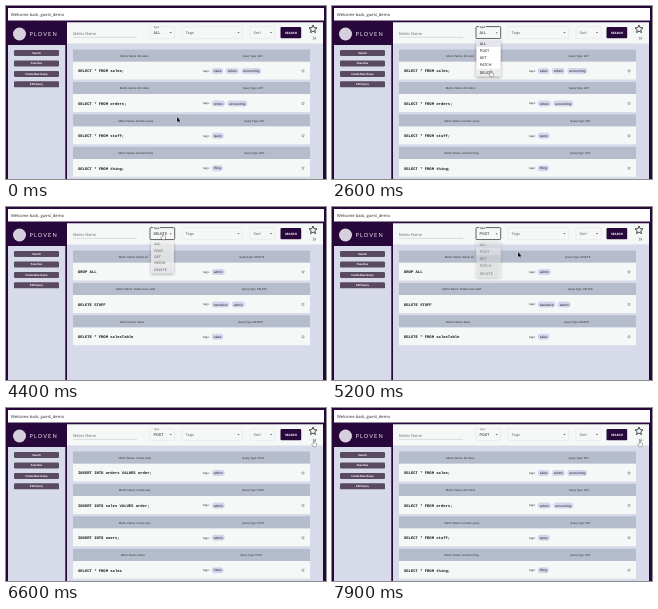
These frames come from a looping animation (320 by 173 pixels, 8000 ms). An HTML page with a canvas:

```html
<!DOCTYPE html>
<html lang="en">
<head>
<meta charset="utf-8">
<title>Query library</title>
<style>
html, body { margin: 0; width: 320px; height: 173px; overflow: hidden; }
canvas { display: block; width: 320px; height: 173px; }
</style>
</head>
<body>
<canvas id="stage"></canvas>
<script>
const canvas = document.getElementById('stage');
const c = canvas.getContext('2d');
const dpr = window.devicePixelRatio || 1;
canvas.width = 320 * dpr;
canvas.height = 173 * dpr;

const LOOP = 8000, STEP = 100;
const DARK = '#28083a', LAVENDER = '#d7dbe9', PAPER = '#f6f8f8', INK = '#222';
const SANS = 'Roboto, sans-serif', MONO = '"Liberation Mono", monospace';
const OPTIONS = ['ALL', 'POST', 'GET', 'PATCH', 'DELETE'];

// Each query: title, statement, tags
const LISTS = {
  GET: [
    ['All sales', 'SELECT * FROM sales;', ['sales', 'orders', 'accounting']],
    ['All orders', 'SELECT * FROM orders;', ['orders', 'accounting']],
    ['Another query', 'SELECT * FROM stuff;', ['query']],
    ['Another thing', 'SELECT * FROM thing;', ['thing']]
  ],
  DELETE: [
    ['Delete all', 'DROP ALL', ['admin']],
    ['Delete more stuff', 'DELETE STUFF', ['executive', 'admin']],
    ['Sales', 'DELETE * FROM salesTable', ['sales']]
  ],
  POST: [
    ['Create order', 'INSERT INTO orders VALUES order;', ['admin']],
    ['Create sale', 'INSERT INTO sales VALUES order;', ['admin']],
    ['Create user', 'INSERT INTO users;', ['admin']],
    ['Sales', 'SELECT * FROM sales', ['Sales']]
  ],
  FAVORITES: []
};

// Pointer path: time, x, y
const PATH = [
  [0, 171, 111], [200, 171, 111], [500, 171, 66], [700, 171, 66],
  [1200, 110, 28], [1500, 110, 28], [1800, 162, 27], [2000, 162, 27],
  [2300, 158, 58], [2400, 158, 58], [2600, 159, 65], [2700, 159, 65],
  [3300, 283, 28], [3600, 283, 28], [4100, 157, 27], [4400, 157, 27],
  [4800, 156, 45], [5100, 156, 45], [5200, 186, 45], [5700, 284, 28],
  [6000, 284, 28], [6500, 308, 33], [6700, 308, 33], [7000, 307, 23],
  [7500, 307, 23], [7600, 308, 33], [8000, 308, 33]
];

const clamp = v => Math.max(0, Math.min(1, v));
const ramp = (t, from, to) => clamp((t - from) / (to - from));
const smooth = p => p * p * (3 - 2 * p);
const mix = (a, b, p) => a + (b - a) * p;
const within = (t, from, to) => t >= from && t < to;

function rect(x, y, w, h, fill, r = 0) {
  c.beginPath();
  c.roundRect(x, y, w, h, r);
  c.fillStyle = fill;
  c.fill();
}

function text(s, x, y, size, color = INK, { align = 'left', weight = 400, font = SANS } = {}) {
  c.font = `${weight} ${size}px ${font}`;
  c.textAlign = align;
  c.textBaseline = 'alphabetic';
  c.fillStyle = color;
  c.fillText(s, x, y + size * 0.355);
}

function widthOf(s, size) {
  c.font = `400 ${size}px ${SANS}`;
  return c.measureText(s).width;
}

function line(points, color, width) {
  c.beginPath();
  points.forEach(([x, y]) => c.lineTo(x, y));
  c.strokeStyle = color;
  c.lineWidth = width;
  c.stroke();
}

function star(x, y, r, color, width) {
  c.beginPath();
  for (let i = 0; i < 10; i++) {
    const a = i * Math.PI / 5 - Math.PI / 2, d = i % 2 ? r * 0.45 : r;
    c.lineTo(x + d * Math.cos(a), y + d * Math.sin(a));
  }
  c.closePath();
  c.strokeStyle = color;
  c.lineWidth = width;
  c.stroke();
}

function pointerAt(t) {
  const i = Math.max(1, PATH.findIndex(p => p[0] > t));
  const [t0, x0, y0] = PATH[i - 1], [t1, x1, y1] = PATH[i];
  const p = smooth(ramp(t, t0, t1));
  return [mix(x0, x1, p), mix(y0, y1, p)];
}

function drawShell() {
  rect(0, 0, 320, 173, DARK);
  rect(2, 2, 316, 12.5, '#fff');
  text('Welcome back, guest_demo', 5, 8.7, 4.1, INK, { font: '"Open Sans", sans-serif' });
  rect(2, 39, 57.3, 134, LAVENDER);
  rect(61, 16.5, 256, 156.5, LAVENDER);
  rect(61, 16.5, 256, 21, PAPER);

  c.beginPath();
  c.arc(13.5, 28, 6.5, 0, 7);
  c.fillStyle = '#d6cfdd';
  c.fill();
  c.letterSpacing = '1.1px';
  text('PLOVEN', 23.5, 27.6, 5.6, '#e9e4ee', { font: 'Lato, sans-serif' });
  c.letterSpacing = '0px';

  ['Search', 'Favorites', 'Create New Query', 'Edit Query'].forEach((label, i) => {
    const y = 44 + i * 10.45;
    rect(8, y, 45, 6, '#594a61', 1.2);
    text(label, 30.5, y + 3, 2.75, '#fff', { align: 'center', weight: 700 });
  });
}

function drawSelect(x, w, value, label, focused, hovered) {
  c.beginPath();
  c.roundRect(x, 20.6, w, 12, 1);
  c.strokeStyle = focused || hovered ? INK : '#d0d2d4';
  c.lineWidth = focused ? 0.7 : 0.3;
  c.stroke();
  if (label) {
    rect(x + 2.8, 19.8, 7, 1.6, PAPER);
    text(label, x + 3.4, 20.8, 2.8, focused ? INK : '#666');
  }
  text(value, x + 3.5, 26.6, 3.9, label ? INK : '#666');
  const ax = x + w - 4, up = focused ? -1 : 1;
  c.beginPath();
  c.moveTo(ax - 1.2, 26.6 - 0.6 * up);
  c.lineTo(ax + 1.2, 26.6 - 0.6 * up);
  c.lineTo(ax, 26.6 + 0.7 * up);
  c.fillStyle = '#666';
  c.fill();
}

function drawToolbar(t, type, [mx, my]) {
  const focus = ramp(t, 1200, 1400) * (1 - ramp(t, 1900, 2100));
  text('Metric Name', 67, mix(27.8, 22.6, focus), mix(4, 3, focus), focus > 0.5 ? INK : '#777');
  line([[67, 31.4], [131, 31.4]], '#999', 0.3);
  if (focus) line([[99 - 32 * focus, 31.3], [99 + 32 * focus, 31.3]], INK, 0.7);

  const open = within(t, 2000, 3400) || within(t, 4300, 5900);
  const over = mx > 143 && mx < 169 && my > 20 && my < 33;
  drawSelect(144, 24.7, type, 'Type', open, over);
  drawSelect(176, 60.5, 'Tags');
  drawSelect(244, 25, 'Sort');

  rect(274.5, 21, 20.7, 11.2, DARK, 1);
  text('SEARCH', 284.9, 26.6, 3.1, '#fff', { align: 'center', weight: 700 });

  star(307, 23.2, 4.2, '#111', 0.75);
  line([[306.8, 31], [308.3, 32.3], [306.8, 33.6]], '#333', 0.5);
  line([[308.6, 31], [310.1, 32.3], [308.6, 33.6]], '#333', 0.5);
}

function drawCard([title, sql, tags], y, method) {
  rect(67, y, 237, 12.2, '#b5bdcd');
  rect(67, y + 12.2, 237, 17.8, PAPER);

  const name = 'Metric Name: ' + title, kind = 'Query Type: ' + method;
  const nameW = widthOf(name, 2.8), kindW = widthOf(kind, 2.8);
  const pad = (237 - nameW - kindW) / 4;
  text(name, 67 + pad, y + 6.3, 2.8, '#333');
  text(kind, 304 - pad - kindW, y + 6.3, 2.8, '#333');

  const mid = y + 21.5;
  text(sql, 72, mid, 3.85, '#111', { weight: 700, font: MONO });
  text('tags:', 197, mid, 3, '#333');
  let x = 205.7;
  for (const tag of tags) {
    const w = widthOf(tag, 3.25) + 4;
    rect(x, mid - 3, w, 6, '#d2d5eb', 3);
    text(tag, x + 2, mid, 3.25, INK);
    x += w + 2.3;
  }
  star(297, mid, 1.5, '#555', 0.35);
}

function drawMenu(t, type, [mx, my]) {
  const first = ramp(t, 1950, 2150) * (1 - ramp(t, 2650, 2850));
  const second = ramp(t, 4250, 4450) * (1 - ramp(t, 5100, 5300));
  const shown = Math.max(first, second);
  if (!shown) return;
  const closing = within(t, 2650, 2900) || t > 5000;
  c.save();
  c.globalAlpha = shown;
  if (!closing) {
    c.translate(156.4, 34);
    c.scale(mix(0.75, 1, shown), mix(0.56, 1, shown));
    c.translate(-156.4, -34);
  }
  c.shadowColor = 'rgba(0,0,0,.4)';
  c.shadowBlur = 3 * dpr;
  c.shadowOffsetY = 1 * dpr;
  rect(144.3, 33.3, 24.4, 37.2, '#fff', 1);
  c.shadowColor = 'transparent';
  OPTIONS.forEach((option, i) => {
    const y = 33.7 + i * 7.25;
    const hover = mx < 169 && my >= y && my < y + 7.25;
    if (option === type) rect(144.3, y, 24.4, 7.25, '#e4e5ee');
    else if (hover) rect(144.3, y, 24.4, 7.25, '#ececec');
    text(option, 147.8, y + 3.6, 3.75);
  });
  c.restore();
}

function drawPointer([x, y], hand) {
  const arrow = 'M0 0V5L1.2 4L2 5.8L2.9 5.4L2.1 3.7H3.6Z';
  const fist = 'M-.5 0Q0-.5.5 0V2L2.4 2.5V4.4L1.8 5.6H-.7L-2 3.5L-1.5 3L-.5 3.6Z';
  const shape = new Path2D(hand ? fist : arrow);
  c.save();
  c.translate(x, y);
  c.lineWidth = 0.6;
  c.strokeStyle = hand ? '#111' : '#fff';
  c.fillStyle = hand ? '#fff' : '#111';
  c.stroke(shape);
  c.fill(shape);
  c.restore();
}

function listAt(t) {
  if (t < 3400) return 'GET';
  if (t < 5900) return 'DELETE';
  if (t < 7100) return 'POST';
  return t < 7700 ? 'FAVORITES' : 'GET';
}

function draw(t) {
  const type = t < 2700 ? 'ALL' : t < 5000 ? 'DELETE' : 'POST';
  const list = listAt(t), pointer = pointerAt(t), [mx, my] = pointer;
  c.setTransform(dpr, 0, 0, dpr, 0, 0);
  c.textRendering = 'geometricPrecision';
  drawShell();
  drawToolbar(t, type, pointer);
  LISTS[list].forEach((query, i) => drawCard(query, 43.5 + i * 32.4, list));
  drawMenu(t, type, pointer);
  const onSelect = mx > 143 && mx < 169 && my < 71;
  const onButton = mx > 274 && my < 37;
  drawPointer(pointer, onSelect && t > 1600 || onButton);
}

const start = performance.now();
function tick() {
  const t = (performance.now() - start) % LOOP;
  draw(Math.floor(t / STEP) * STEP);
  requestAnimationFrame(tick);
}
tick();
</script>
</body>
</html>
```
